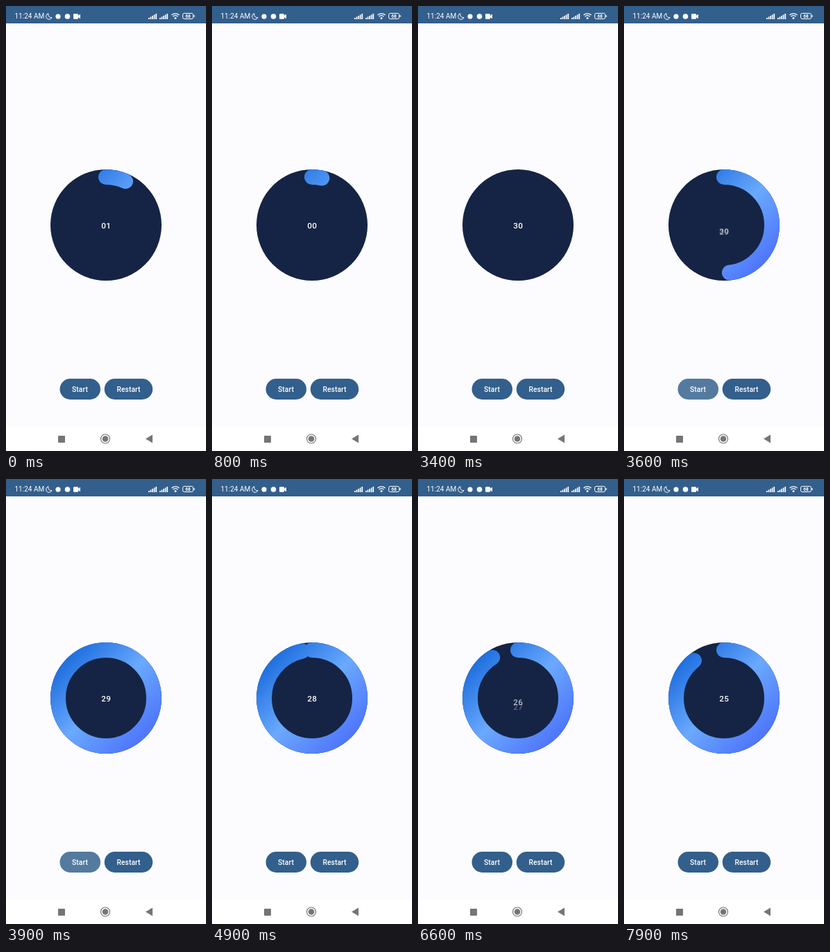
An HTML page for the animation above (8 s loop, 288 px wide and 640 px high).

```html
<!DOCTYPE html>
<html lang="en">
<head>
<meta charset="utf-8">
<title>Countdown timer</title>
<style>
  html, body { margin: 0; width: 288px; height: 640px; overflow: hidden; background: #fcfcff; }
  svg { display: block; font-family: Roboto, sans-serif; fill: #fff; }
  .count { font-size: 11.73px; font-weight: 500; letter-spacing: .37px; text-anchor: middle; }
  .label { font-size: 10.27px; font-weight: 500; letter-spacing: .07px; text-anchor: middle; }
  .line { fill: none; stroke: #fff; }
</style>
</head>
<body>
<svg width="288" height="640" viewBox="0 0 288 640">
  <defs>
    <linearGradient id="blue" gradientUnits="userSpaceOnUse" x1="64" y1="235" x2="224" y2="395">
      <stop offset="0" stop-color="#0058d2"/>
      <stop offset=".5" stop-color="#6aa9fe"/>
      <stop offset="1" stop-color="#4360fa"/>
    </linearGradient>
    <clipPath id="pill"><rect x="77.5" y="536" width="58.5" height="30" rx="15"/></clipPath>
  </defs>

  <rect width="288" height="25" fill="#335f8c"/>
  <text x="12.5" y="18.3" font-size="10">11:24 AM</text>
  <path d="M61 10.8a4.3 4.3 0 1 0 5 5.700a4.300 4.300 0 0 1 -5 -5.700z" class="line"/>
  <circle cx="75" cy="15" r="3.6"/>
  <circle cx="88.500" cy="15" r="3.800"/>
  <path d="M98 11.300h5a1 1 0 0 1 1 1v1.500l3 -2v6.400l-3 -2v1.500a1 1 0 0 1 -1 1h-5a1 1 0 0 1 -1 -1v-5.400a1 1 0 0 1 1 -1z"/>
  <g id="bars"></g>
  <g class="line" stroke-width="1.300">
    <path d="M238.500 13a8 8 0 0 1 11 0M240.500 15.200a5 5 0 0 1 7 0"/>
    <rect x="254.500" y="10.500" width="15" height="8" rx="2.300" stroke-width="1"/>
  </g>
  <circle cx="244" cy="17.500" r="1.500"/>
  <rect x="270.500" y="13" width="1.200" height="3"/>
  <text x="262" y="17" font-size="6.500" font-weight="700" text-anchor="middle">68</text>

  <circle cx="144" cy="315" r="80" fill="#152444"/>
  <path id="arc" d="M144 246a69 69 0 0 1 0 138a69 69 0 0 1 0 -138" pathLength="360"
        fill="none" stroke="url(#blue)" stroke-width="22" stroke-linecap="round"/>
  <text id="old" class="count" x="144.200" y="320"></text>
  <text id="now" class="count" x="144.200" y="320"></text>

  <g fill="#335f8c">
    <rect x="77.500" y="536" width="58.500" height="30" rx="15"/>
    <rect x="141.700" y="536" width="69.500" height="30" rx="15"/>
  </g>
  <circle id="ripple" cx="106.500" cy="551" clip-path="url(#pill)"/>
  <text class="label" x="106.500" y="554.800">Start</text>
  <text class="label" x="176.500" y="554.800">Restart</text>

  <rect y="605" width="288" height="35"/>
  <g fill="#757575">
    <rect x="75" y="618" width="10" height="10" rx=".8"/>
    <circle cx="143" cy="622.500" r="4.300"/>
    <circle cx="143" cy="622.500" r="6.500" fill="none" stroke="#757575" stroke-width="1.200"/>
    <path d="M201 622.500l10 -6v12z"/>
  </g>
</svg>
<script>
const LOOP = 8000, LINE = 17.6;
// time, number shown, arc sweep in degrees
const ticks = [
  [-940, '01', 24],
  [60, '00', 12],
  [1000, '30', 0],
  [3520, '29', 360],
  [4560, '28', 348],
  [5520, '27', 336],
  [6480, '26', 324],
  [7480, '25', 321.4]
];
const $ = id => document.getElementById(id);
const clamp = v => Math.min(1, Math.max(0, v));

// critically damped spring, stiffness 400
const spring = ms => ms > 480 ? 1 : 1 - (1 + ms / 50) * Math.exp(-ms / 50);

let bars = '';
for (const x of [205, 221])
  for (let i = 0; i < 5; i++) {
    const h = 2 + i * 1.5;
    bars += `<rect x="${x + i * 2.6}" y="${19 - h}" width="1.7" height="${h}"/>`;
  }
$('bars').innerHTML = bars;

function setNumber(el, text, shift, alpha) {
  if (el.textContent !== text) el.textContent = text;
  el.setAttribute('transform', `translate(0 ${shift.toFixed(2)})`);
  el.setAttribute('opacity', alpha.toFixed(3));
}

function draw(t) {
  let i = ticks.length - 1;
  while (ticks[i][0] > t) i--;
  const [start, text, sweep] = ticks[i];
  const [, oldText, oldSweep] = ticks[Math.max(0, i - 1)];
  const p = spring(t - start);

  const angle = oldSweep + (sweep - oldSweep) * p;
  $('arc').setAttribute('stroke-dasharray', `${angle} 720`);
  $('arc').setAttribute('visibility', angle < 1 ? 'hidden' : 'visible');
  setNumber($('old'), oldText, LINE * p, 1 - p);
  setNumber($('now'), text, LINE * (1 - p), p);

  const grow = clamp((t - 3400) / 225);
  const fade = clamp((4420 - t) / 400);
  $('ripple').setAttribute('r', 10 + 24 * grow);
  $('ripple').setAttribute('opacity', 0.17 * clamp((t - 3400) / 75) * fade);
}

function frame() {
  draw(performance.now() % LOOP);
  requestAnimationFrame(frame);
}
frame();
</script>
</body>
</html>
```
